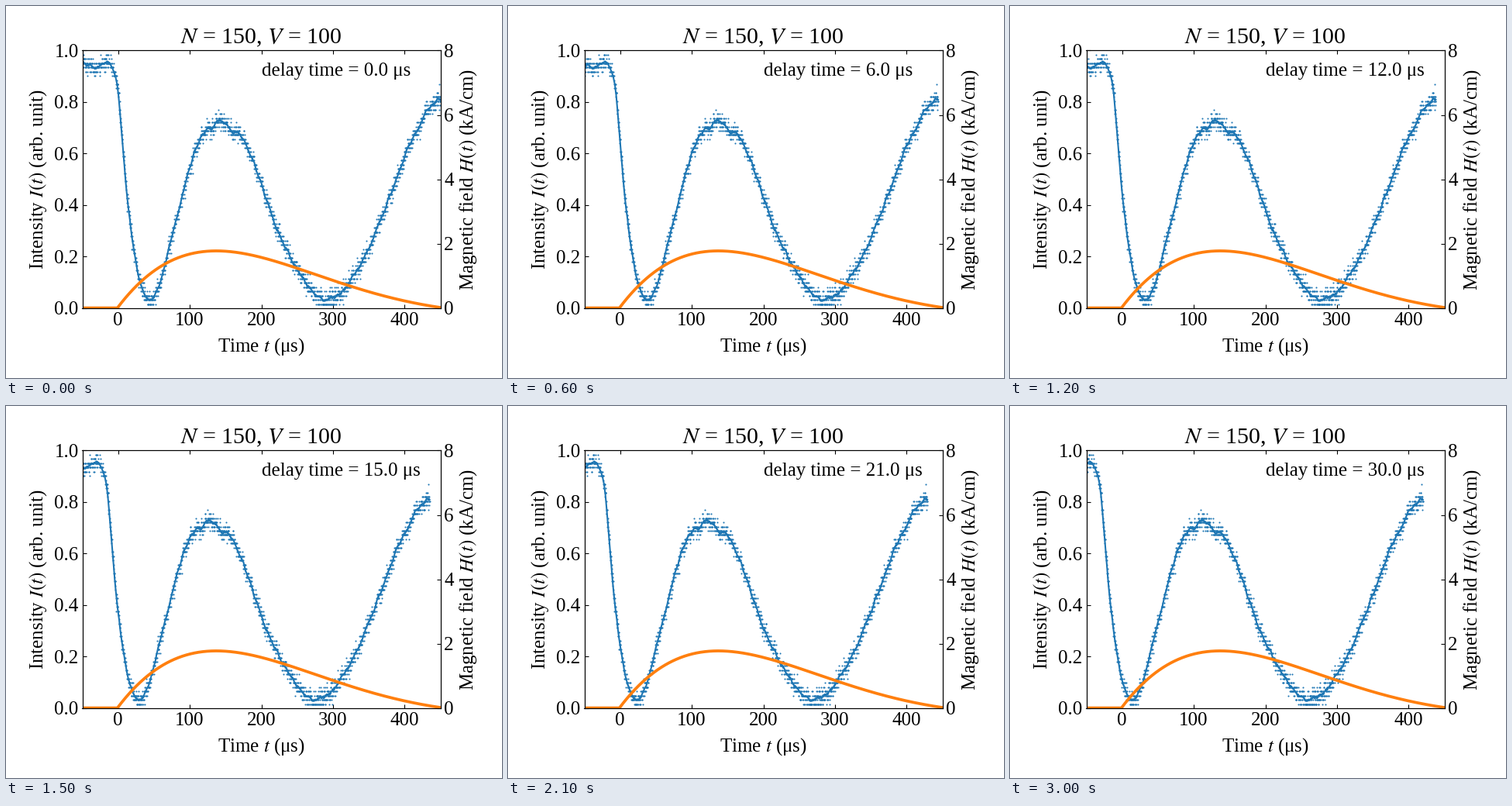
Recreate the animation shown at these times as a matplotlib script. Size 640 by 480 pixels, loop 3100 ms.

```python
import numpy as np
import matplotlib.pyplot as plt
from matplotlib.animation import FuncAnimation

W, H, DPI = 640, 480, 100
FRAMES, INTERVAL = 31, 100
LEVELS = 61          # digitizer steps per unit intensity
NOISE = 0.018

plt.rcParams.update({
    "font.family": "Liberation Serif",
    "mathtext.fontset": "stix",
    "font.size": 18,
    "xtick.direction": "in",
    "ytick.direction": "in",
    "xtick.top": True,
    "axes.linewidth": 0.8,
})

# Optical phase (rad) at a few times (µs)
PHASE = [
    (-12, 0), (-3, .2), (10, .78), (22, 1.105), (43, 1.571), (70, 2.06),
    (100, 2.43), (122, 2.59), (144, 2.63), (167, 2.575), (190, 2.44),
    (222, 2.15), (255, 1.905), (290, 1.571), (330, 1.245), (372, .9),
    (410, .6), (450, .36),
]


def smooth(values, window):
    """Centred moving average over an odd number of samples."""
    padded = np.pad(values, window // 2, mode="reflect")
    return np.convolve(padded, np.ones(window) / window, mode="valid")


def intensity(t):
    phase = smooth(np.interp(t, *zip(*PHASE)), 33)
    mean = 0.033 + 0.912 * np.cos(phase) ** 2
    ripple = 0.016 * np.cos(2 * np.pi * (t + 16) / 32)
    return mean + ripple * mean ** 2


def field(t):
    """Damped sine pulse of the coil, in kA/cm."""
    s = np.clip(t + 1, 0, None)
    return 0.01 + 4.273 * np.sin(np.pi * s / 455) * np.exp(-s / 203.9)


rng = np.random.default_rng(7)
time = np.arange(-50, 450.01, 0.25)
noisy = intensity(time) + rng.normal(0, NOISE, time.size)
samples = np.clip(np.round(noisy * LEVELS), 1, 60) / LEVELS
trend = smooth(samples, 21)

fig = plt.figure(figsize=(W / DPI, H / DPI), dpi=DPI, facecolor="white")
ax = fig.add_axes([98.5 / W, 90 / H, 462 / W, 332.6 / H])
ax.set(xlim=(-50, 450), ylim=(0, 1))
ax.set_xticks(range(0, 401, 100))
ax.set_xlabel("Time $t$ (μs)", labelpad=6.5)
ax.set_ylabel("Intensity $I(t)$ (arb. unit)", labelpad=5.2)
ax.set_title("$N$ = 150, $V$ = 100", pad=6.5)

dots, = ax.plot(time, samples, "o", color="C0", ms=1.5, mew=0)
line, = ax.plot(time, trend, color="C0", lw=1.5)
label = ax.text(200, 0.902, "")

ax2 = ax.twinx()
ax2.set_ylim(0, 8)
ax2.set_yticks(range(0, 9, 2))
ax2.set_ylabel("Magnetic field $H(t)$ (kA/cm)")
ax2.plot(time, field(time), color="C1", lw=2.7)


def update(delay):
    for artist in (dots, line):
        artist.set_xdata(time - delay)
    label.set_text(f"delay time = {delay:.1f} μs")
    return dots, line, label


anim = FuncAnimation(fig, update, frames=FRAMES, interval=INTERVAL,
                     repeat=True, repeat_delay=0, blit=False)
plt.show()
```
